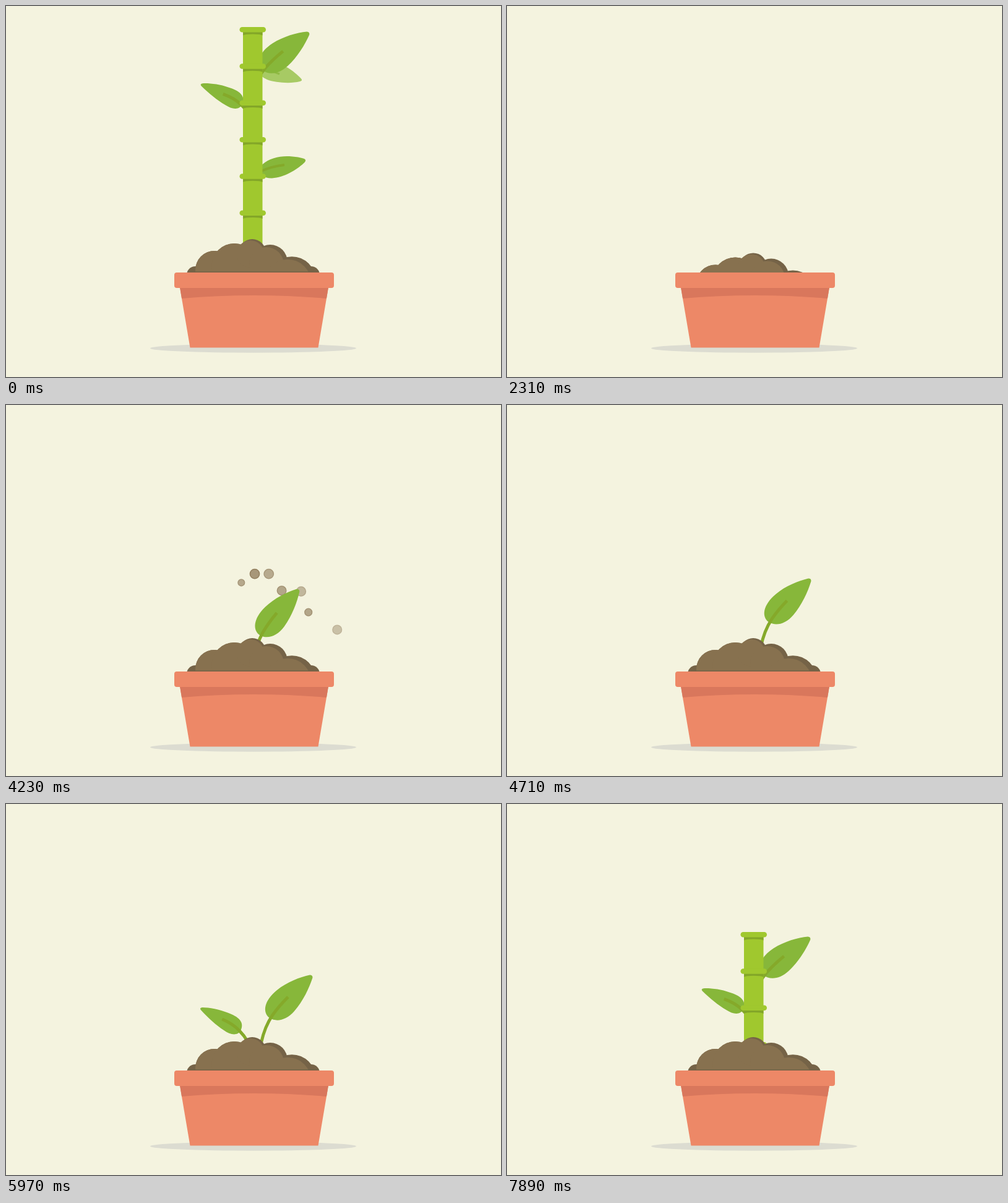
Recreate the animation shown at these times as an HTML page. Size 800 px wide and 600 px high, loop 8000 ms.

```html
<!DOCTYPE html>
<html lang="en">
<head>
<meta charset="utf-8">
<title>Growing plant</title>
<style>
  html, body { margin: 0; width: 100%; height: 100%; overflow: hidden; background: #f4f3df; }
  svg { display: block; width: 800px; height: 600px; }
  .leaf { fill: #87b73a; }
  .vein { fill: none; stroke: #85a92a; stroke-width: 5; }
  .light { fill: #87714f; }
  .dark { fill: #756347; }
  .pot { fill: #ed8867; }
  #dust { fill: #87714f; fill-opacity: .8; stroke: #87714f; stroke-width: 1.5; }
</style>
</head>
<body>
<svg viewBox="0 0 800 600">
  <clipPath id="aboveRim"><path d="M0 0H800V431H0Z"/></clipPath>
  <ellipse cx="399.5" cy="553.5" rx="166.5" ry="7.2" fill="#dcdcd1"/>
  <g id="dust"></g>
  <g clip-path="url(#aboveRim)">
    <g id="extra">
      <path fill="#a7ca64" d="M410 106C418 92 440 94 452 98C463 104 472 112 477 117.5Q480 120.5 475 122C460 126 435 124 422 119C414 115 410 112 410 106Z"/>
      <path fill="none" stroke="#8fb944" stroke-width="3" d="M410 104Q428 104 442 110"/>
      <path class="leaf" d="M410 262C418 248 440 242 458 243Q474 244 482 247Q486 249 482.5 253C470 265 450 277 430 278.5C418 279 410 274 410 262Z"/>
      <path class="vein" style="stroke-width:4" d="M410 268Q430 259 450 257"/>
    </g>
    <g id="right">
      <path class="leaf" d="M426 346C414 337 417 318 438 301C454 288 475 280 491 276.5Q496 276.5 495.5 281C490 298 480 319 466 335C453 350 437 353 426 346Z"/>
      <path class="vein" d="M412.5 386Q418 360 431 341Q441 327 456 312"/>
    </g>
    <g id="left">
      <path class="leaf" d="M379 366C386 352 375 343 358 337C345 331.5 328 328.5 317 328.5Q312 329 314.5 332.5C326 345 339 357 352 365.5C362 373 374 375 379 366Z"/>
      <path class="vein" d="M349 347.5Q367 355 377 366Q385 374 390 383"/>
    </g>
    <g id="stalk"><path fill="#a0c82e" d="M383 38H414.5V440H383Z"/></g>
    <g id="soil"></g>
    <path id="base" class="dark" d="M303 429.5H496V431H303Z"/>
  </g>
  <g id="pot">
    <path class="pot" d="M281 455H521L504.5 552.5H297.5Z"/>
    <path fill="#d9775c" d="M281 455H521L518 473Q400 463 284 473Z"/>
    <rect class="pot" x="272" y="431" width="258" height="25" rx="4"/>
  </g>
</svg>
<script>
const el = id => document.getElementById(id);
const repeat = (n, make) => Array.from({ length: n }, (_, i) => make(i)).join('');
const show = (id, on) => el(id).setAttribute('visibility', on ? 'visible' : 'hidden');
const place = (id, x, y, turn = 0, cx = 0, cy = 0) =>
  el(id).setAttribute('transform', `translate(${x} ${y}) rotate(${turn} ${cx} ${cy})`);
const circle = (x, y, r, attrs) => `<circle cx="${x}" cy="${y}" r="${r}" ${attrs}/>`;

// Evenly spaced joints: a rounded ring with a curved shadow below
el('stalk').innerHTML += repeat(6, i => `<g transform="translate(0 ${34 + 59.3 * i})">
  <path fill="#83a628" d="M383 6H414.5V13.5Q412 11.5 398.7 11.5T383 13.5Z"/>
  <rect x="377.5" width="42.5" height="8.5" rx="4.25" fill="#a0c82e"/>
</g>`);

// Soil lobes: x, y, radius, width of the shaded edge
const lobes = [[337, 427, 31, 0], [369, 420.6, 36.6, 0], [395, 401, 22, 3], [421, 418, 28, 6], [455, 448, 38.3, 7]];
el('soil').innerHTML =
  [306, 493].map(x => circle(x, 435, 14, 'class="dark"')).join('') +
  lobes.map(([x, y, r, edge]) => circle(x + edge, y - edge * .65, r, 'class="dark"')).join('') +
  lobes.map(([x, y, r]) => circle(x, y, r, 'class="light"')).join('');

function seeded(seed) {
  return () => (seed = (seed * 16807) % 2147483647) / 2147483647;
}

// A fan of grains thrown from the soil at sideways speeds from vMin to vMax
function burst(time, start, n, vMin, vMax, life) {
  const random = seeded(start);
  return repeat(n, i => {
    const vx = vMin + (vMax - vMin) * i / (n - 1);
    const vy = .7 * Math.abs(vx) - 840 - 100 * random();
    const r = 4 + 4 * Math.sqrt(random());
    const age = (time - start) / 1000 - .03 - .15 * random();
    const opacity = Math.min(1, 4 * (life - age));
    if (age < 0 || opacity <= 0) return '';
    return circle(400 + vx * age, 392 + vy * age + 1500 * age * age, r, `opacity="${opacity}"`);
  });
}

function ease(t, start, end) {
  const p = Math.min(1, Math.max(0, (t - start) / (end - start)));
  return 1 - (1 - p) ** 2;
}

function draw(t) {
  const full = t < 300;
  const seen = start => full || t >= start;
  show('extra', full);
  show('pot', seen(330));
  show('soil', seen(1470));
  show('right', seen(3840));
  show('left', seen(4710));
  show('stalk', seen(6330));

  const sunk = full ? 0 : 54 - 22 * ease(t, 1440, 1890) - 15 * ease(t, 2130, 2580) - 17 * ease(t, 2850, 3390);
  place('soil', 0, sunk);
  show('base', sunk < 6);

  // Leaves spring out of the soil, then join the stalk and ride it upwards
  const join = full ? 1 : ease(t, 6300, 7110);
  const lift = full ? 233 : 60 * ease(t, 7110, 7890);
  const decay = (start, tau) => full ? 0 : Math.exp((start - t) / tau);
  const r = decay(3810, 290), l = decay(4680, 250);
  const swing = Math.cos((t - 4680) / 207);
  place('right', -77 * r - 8.5 * join, 103 * r - 6 * join - lift, 6 * join - 21.5 * r, 455, 314);
  place('left', 45 * l + 2 * join, 90 * l * swing + Math.min(0, 28 - lift), 34 * l - 3 * join, 348, 351);
  place('stalk', 0, 352 - 119 * join - lift);

  el('dust').innerHTML = burst(t, 3840, 7, -70, 400, .46) + burst(t, 4710, 6, -450, 60, .34);
}

const begin = performance.now();
function frame() {
  const t = (performance.now() - begin) % 8000;
  draw(t - t % 30);
  requestAnimationFrame(frame);
}
frame();
</script>
</body>
</html>
```
